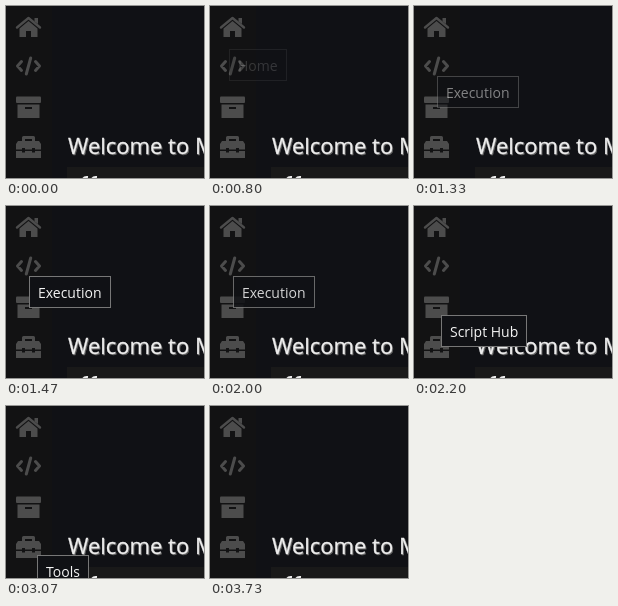
An HTML page for the animation above (3990 ms loop, 198 by 172 pixels).

```html
<!DOCTYPE html>
<html lang="en">
<head>
<meta charset="utf-8">
<title>Sidebar tooltips</title>
<style>
  html, body { margin: 0; width: 100%; height: 100%; overflow: hidden; background: #101115; }
  svg { display: block; width: 198px; height: 172px; font-family: "Open Sans", "Noto Sans", sans-serif; }
  .title { font-size: 22px; fill: #eee; stroke: #eee; stroke-width: .3; filter: drop-shadow(1px 1px .5px #666); }
  .icons { fill: #4c4c4c; }
  .icons .line { fill: none; stroke: #4c4c4c; stroke-width: 3; stroke-linecap: round; stroke-linejoin: round; }
  .tip rect { fill: #101115; stroke: #777; }
  .tip text { fill: #f4f4f4; font-size: 14px; }
</style>
</head>
<body>
<svg id="stage" viewBox="0 0 198 172">
  <rect width="198" height="172" fill="#101115"/>
  <rect width="46" height="172" fill="#121213"/>
  <rect x="61" y="161" width="137" height="11" fill="#191919"/>
  <text class="title" x="62" y="148">Welcome to M</text>
  <path d="M77 173q1-2.500 5-2M86 173q1-2.500 5-2" fill="none" stroke="#eee" stroke-width="2"/>

  <g class="icons">
    <!-- home -->
    <path class="line" style="stroke-width:2.4" d="M11 21.500L22.500 12L34 21.500"/>
    <path d="M28.500 12h3.500v6l-3.500-2.500zM22.500 15L31.500 22.500V31h-6.500v-6h-5v6h-6.500v-8.500z"/>
    <!-- code -->
    <path class="line" d="M15.500 55.500L11.500 60l4 4.500M29.500 55.500l4 4.500l-4 4.500M24.700 52l-4.400 16"/>
    <!-- archive -->
    <rect x="10" y="90.500" width="25" height="6.500" rx="1"/>
    <path d="M11.500 98.500h22V112h-22zM19 101v2h7v-2z" fill-rule="evenodd"/>
    <!-- toolbox -->
    <path class="line" d="M17.500 136v-4.500h10v4.500"/>
    <path d="M12 135h21l2 3v5.500h-6v-1.500h-3v1.500h-7v-1.500h-3v1.500h-6V138z"/>
    <path d="M10 145h6v1.500h3V145h7v1.500h3V145h6v7h-25z"/>
  </g>
</svg>
<script>
const LOOP = 3990;
const TICK = 66.6;  // the picture advances 15 times a second
const FADE = 2.2;   // ticks a tooltip takes to appear or vanish
const stage = document.getElementById('stage');

function add(parent, tag, attrs) {
  const el = document.createElementNS('http://www.w3.org/2000/svg', tag);
  for (const key in attrs) el.setAttribute(key, attrs[key]);
  return parent.appendChild(el);
}

// The pointer drifts 4 px to the right from one icon to the next.
function makeTip({ label, y, open, close }, i) {
  const x = 19 + 4 * i;
  const node = add(stage, 'g', { class: 'tip' });
  const box = add(node, 'rect', { x: x + .5, y: y + .5, height: 31 });
  const text = add(node, 'text', { x: x + 9, y: y + 22 });
  text.textContent = label;
  box.setAttribute('width', Math.round(text.getComputedTextLength() + 17));
  return { node, open, close };
}

// open and close are counted in ticks
const tips = [
  { label: 'Home', y: 43, open: 11.65, close: 17.8 },
  { label: 'Execution', y: 70, open: 18.9, close: 29.7 },
  { label: 'Script Hub', y: 109, open: 30.8, close: 42.5 },
  { label: 'Tools', y: 149, open: 43.7, close: 53.7 }
].map(makeTip);

const ramp = ticks => Math.min(1, Math.max(0, ticks / FADE));

function draw(time) {
  const tick = Math.floor((time % LOOP + 3) / TICK);
  for (const { node, open, close } of tips)
    node.setAttribute('opacity', ramp(tick - open) - ramp(tick - close));
}

let begin;
function run(now) {
  begin ??= now;
  draw(now - begin);
  requestAnimationFrame(run);
}
draw(0);
requestAnimationFrame(run);
</script>
</body>
</html>
```
